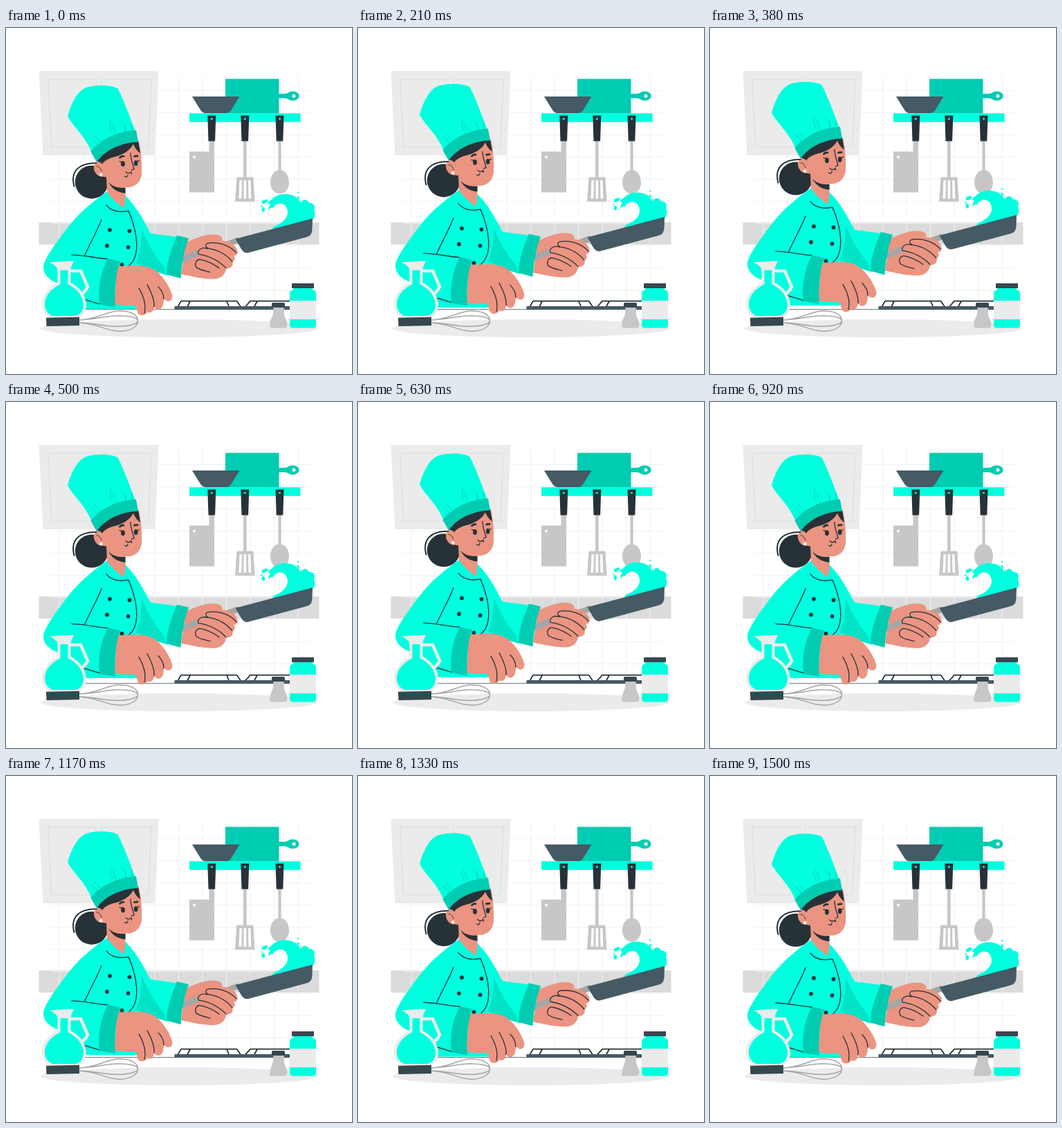
Write an HTML page that moves like this. It is 500x500 px and loops after 1.54 s.

```html
<!DOCTYPE html>
<html lang="en">
<head>
<meta charset="utf-8">
<title>Cooking</title>
<style>
html, body { margin: 0; width: 100%; height: 100%; overflow: hidden; background: #fff; }
svg { display: block; width: 100vw; height: 100vh; }
.cy { fill: #00ffdf; }
.dc { fill: #00ccb2; }
.dk { fill: #263238; }
.sl { fill: #455a64; }
.nv { fill: #37474f; }
.gr { fill: #c7c7c7; }
.lt { fill: #ebebeb; }
.sk { fill: #eb9481; }
.wh { fill: #fff; }
.ln { fill: none; stroke: #263238; stroke-width: 1.3; stroke-linecap: round; stroke-linejoin: round; }
.pl { fill: none; stroke: #00d6bb; stroke-width: 1; stroke-linecap: round; }
</style>
</head>
<body>
<svg viewBox="0 0 500 500">
  <rect class="wh" width="500" height="500"/>
  <rect x="47.500" y="281" width="405" height="32" fill="#dbdbdb"/>
  <path id="grid" fill="none" stroke="#f1f1f1"/>
  <path class="lt" d="M47.500 62H220.500L215.500 184H53.500Z"/>
  <path d="M61 74H130L128 172H65.500ZM138 74H210L206 172H140Z" fill="none" stroke="#dcdcdc"/>

  <!-- shelf -->
  <rect class="dc" x="317" y="73.500" width="77.500" height="50"/>
  <path class="dc" d="M394 95H403C407 95 409 91.500 414 91.500C420 91.500 423.500 94.500 423.500 98C423.500 102 420 105 414 105C409 105 407 101.500 403 101.500H394Z"/>
  <circle class="wh" cx="416" cy="98.300" r="2.500"/>
  <path class="sl" d="M269 99H337.500L325.500 118.500Q322.500 123.300 317 123.300H289.500Q284 123.300 281 118.500Z"/>
  <rect class="cy" x="265" y="123.300" width="160.500" height="12.500"/>

  <!-- hanging tools -->
  <path class="gr" d="M293.500 160H301V237.500H265V178.500H293.500Z"/>
  <circle class="wh" cx="272" cy="186.500" r="2"/>
  <path class="gr" d="M343 160H347.700V215.500H357.500L359.500 251H331L333.500 215.500H343Z"/>
  <path class="wh" d="M337.500 220H341L340.300 246.500H336.500ZM343.700 220H347.200V246.500H343.500ZM350 220H353.500L354.300 246.500H350.500Z"/>
  <path class="gr" d="M393.300 160H397.700V205.500C405 207 409 215 409 223C409 233 403 239.500 395.500 239.500C388 239.500 382 233 382 223C382 215 386 207 393.300 205.500Z"/>
  <g id="grips"></g>

  <!-- hob -->
  <path d="M114 406.700H448" stroke="#5f6e75"/>
  <ellipse class="lt" cx="250" cy="434" rx="200" ry="13"/>
  <path class="ln" style="stroke-width:1.800" d="M248.500 402.500L253 394.600H333.500L339 402.500M262.500 402L266 395M322 402L319 395M346 402.500L353 394.600H412M359 402L363 395"/>
  <rect class="sl" x="243.500" y="402" width="168" height="5"/>

  <g id="cook">
    <!-- bun, neck, torso -->
    <circle class="dk" cx="123.800" cy="222.800" r="24"/>
    <path class="ln" style="stroke-width:2" d="M98.500 229C93 208 104 194 134 195.500"/>
    <path class="cy" d="M147 236C128 249 107 266 91 286C75 307 57 331 54 344C53 356 62 364 74 369L100 385V406.300H190V385L200 344L233 358L247 302L209 297C202 285 192 262 173 243Z"/>
    <path fill="#00e3c7" d="M196 291C206 315 217 332 229 346L231 357C216 353 200 346 188 340C194 327 196 310 196 291Z"/>
    <path class="sk" d="M145 215L146 237C152 247 161 253 169 260C172 257 172 252 172.500 245V222Z"/>
    <path class="dk" d="M148 223C154 230 164 232 172.500 231V239C162 238 153 233 148 223Z"/>
    <path class="ln" d="M145 256C152 265 164 267 177 264.500C186 285 193 314 186 332C184 338 180 342 176 345"/>
    <path class="ln" d="M138 277C132 293 121 312 113.500 329M95 328C110 328 126 332 147 334M112 392L135 399"/>
    <g id="buttons" class="dk"></g>

    <!-- head -->
    <path class="sk" d="M132 196C131 193 140 180 150 176L192 164C195 176 197 195 196 212C194 224 186 230 177 230.500C164 230 153 226 146 216L140 215C133 216 127 209 127 202C127 197 129 195 132 196Z"/>
    <path class="dk" d="M130 193C140 176 163 165 191 163L194 181C189 178 186 173 184 168C179 178 168 184 155 187C148 189 142 192 139 197C137 194 134 193 130 193Z"/>
    <path class="ln" style="stroke-width:1" d="M131 200C135 200 137 204 138 207"/>
    <circle class="wh" cx="137.300" cy="212" r="2.300"/>
    <g class="dk">
      <ellipse cx="169" cy="196.500" rx="2.900" ry="4"/>
      <ellipse cx="187.700" cy="195.300" rx="2.800" ry="4"/>
    </g>
    <path class="ln" d="M164 193L168 194M190 193L192.500 191.500M180 181C180 190 184 198 185 204L181.500 205.500M173 208C176 211 179 210 181 208L181.500 211M171.500 214.500C174 216.500 176 215 176 212.500"/>
    <path class="ln" style="stroke-width:2.800" d="M164.500 187.500C166 185.500 168 185 170 185.500M185.500 185.500L190 185"/>
    <path class="cy" d="M124 181C117 159 96 142 89 127.500C95 107 103 92 115 86.500C132 81 153 83 161.500 87.500C170 104 179 128 187 150Z"/>
    <path class="dc" d="M122.500 179C136 162 160 149 188 148L191 165C165 166 143 177 131 194Z"/>
    <path class="pl" d="M154 152C150 146 149 140 152 134M159 151C156 147 155 143 155 139M174 149C172 144 170 139 166 135M172 149C174 144 173 139 172 138M182 148V139M132 170C130 166 127 162 123 160M137 166C134 162 131 158 128 157"/>

    <!-- pan arm -->
    <path d="M308 317L336 306.500" stroke="#a6a6a6" stroke-width="8.500"/>
    <path class="sk" d="M260 310C274 304 288 297 304 299C311 300 314 304 312 308C322 307 331 314 334 320C336 326 333 330 329 329C332 333 331 337 327 338C330 344 324 348 318 348C317 357 310 363 299 363C283 363 268 359 253 356Z"/>
    <path d="M254 335L278 325" stroke="#a6a6a6" stroke-width="9"/>
    <path class="ln" d="M333 325C322 313 306 309 292 311C287 312 288 318 294 319C308 321 320 329 327 338M291 319C283 316 276 321 278 327C292 329 306 335 318 347M282 335C275 333 272 341 275 346C281 350 288 351 295 353M282 335C292 337 301 342 308 347"/>
    <path class="dc" d="M247 300L264 304C257 323 254 342 252.500 362L232 356.500C232 338 239 320 247 300Z"/>

    <!-- splash and pan -->
    <path class="cy" d="M380 263C378 259 382 258 381 254C377 255 379 250 383 249C389 242 398 239 407 240.500C416 241 422 246 426 253C428 247 436 247 438 253C444 252 448 258 445 263C448 269 446 275 443 277L384 292L387 287C399 283 407 275 407 267C407 256 399 251 391 255C386 257 387 262 383 260Z"/>
    <g class="cy">
      <ellipse cx="374" cy="251" rx="4.800" ry="2.500" transform="rotate(-25 374 251)"/>
      <ellipse cx="371.800" cy="262.500" rx="2.300" ry="3.400"/>
      <circle cx="369.500" cy="257.500" r="1.200"/>
      <ellipse cx="422.500" cy="245.500" rx="1.500" ry="2.500" transform="rotate(-20 422.500 245.500)"/>
      <circle cx="422" cy="238" r="1.200"/>
    </g>
    <path class="sl" d="M331.500 305L443 275.500L442.500 291C442 298 440 301 434 302.500L350 325C345 326 342 323 339 318Z"/>

    <!-- resting arm -->
    <path class="sk" d="M160 345C183 343 203 342 215 350C227 358 239 378 240.500 388C240 397 232 397 228 391C228 398 227 406 221 407C217 407 215 405 214 402C214 410 209 413 204 411C202 416 193 417 191 413C189 408 189 404 186 401C177 401 166 402 157 399Z"/>
    <path class="ln" d="M192 376C199 388 203 400 200 412M204 371C210 382 215 393 214 403M220 374C225 379 228 386 228 392"/>
    <path class="dc" d="M147 333.500L165 337.500C158 357 156 382 158 404L135 400C132 376 137 353 147 333.500Z"/>
  </g>

  <!-- counter items -->
  <path id="whisk" fill="none" stroke="#a6a6a6" stroke-width="1.500"/>
  <path d="M91 351H108L118 374C115 382 108 385 103 388" fill="none" stroke="#ebebeb" stroke-width="4.500" stroke-linejoin="round"/>
  <path class="cy" d="M76.500 345V369C63 376 54 387 54 399C54 409 59 415 67 418H100C108 417 114 410 114 400C113 387 105 376 91.500 369V345Z" stroke="#ebebeb" stroke-width="4"/>
  <path class="lt" d="M63 338.500L98 336.500C97 341 93.500 344 93.500 350H74.500C74.500 345 69 342 63 338.500Z"/>
  <path class="nv" d="M58 418.800L106 417.800V430L58.500 431Z"/>

  <path class="gr" d="M386 403H402C401 412 402 417 406 424C407 429 406 433.500 403 433.500H384C380 433.500 381 426 383 421C386 415 387 409 386 403Z"/>
  <rect class="nv" x="384" y="397" width="19" height="7" rx="1.500"/>
  <path class="cy" d="M415 375H443V378.500Q448 379 448 384V429Q448 433.500 443 433.500H415Q410 433.500 410 429V384Q410 379 415 378.500Z"/>
  <rect class="lt" x="410" y="394" width="38" height="27"/>
  <rect class="nv" x="413" y="369" width="32" height="7"/>
</svg>
<script>
const LOOP = 1540, STEPS = 37, LIFT = 8.8, LEAD = 62;
const byId = id => document.getElementById(id);
const cook = byId('cook');

const cols = Array.from({ length: 11 }, (_, i) => `M${(77 + i * 34.5).toFixed(1)} 68V404`);
const rows = Array.from({ length: 10 }, (_, i) => `M65 ${90.5 + i * 32}H440`);
byId('grid').setAttribute('d', cols.concat(rows).join(''));

byId('grips').innerHTML = [297.3, 345.3, 395.5].map(x =>
  `<path class="dk" d="M${x - 6} 126.500H${x + 6}L${x + 4.8} 163.500H${x - 4.8}Z"/>` +
  `<circle class="cy" cx="${x}" cy="131.200" r="1.500"/>`).join('');

byId('buttons').innerHTML = [[150, 292], [178.5, 293.5], [146, 314.8], [176.5, 317], [167.5, 342]]
  .map(([x, y]) => `<circle cx="${x}" cy="${y}" r="2.900"/>`).join('');

byId('whisk').setAttribute('d', [[407, 440], [414, 433]].map(([a, b]) =>
  `M106 422C134 421 149 ${a} 168 ${a + 2}C198 ${a + 3} 198 ${b - 4} 168 ${b - 2}C149 ${b} 134 427 106 426`
).join(''));

function draw(ms) {
  const step = Math.floor((ms + 2) % LOOP / LOOP * STEPS);
  const phase = (step * LOOP / STEPS + LEAD) / LOOP * 2 * Math.PI;
  const y = -LIFT * (1 - Math.cos(phase)) / 2;
  cook.setAttribute('transform', `translate(0 ${y.toFixed(2)})`);
}

const start = performance.now();
function tick() {
  draw(performance.now() - start);
  requestAnimationFrame(tick);
}
tick();
</script>
</body>
</html>
```
